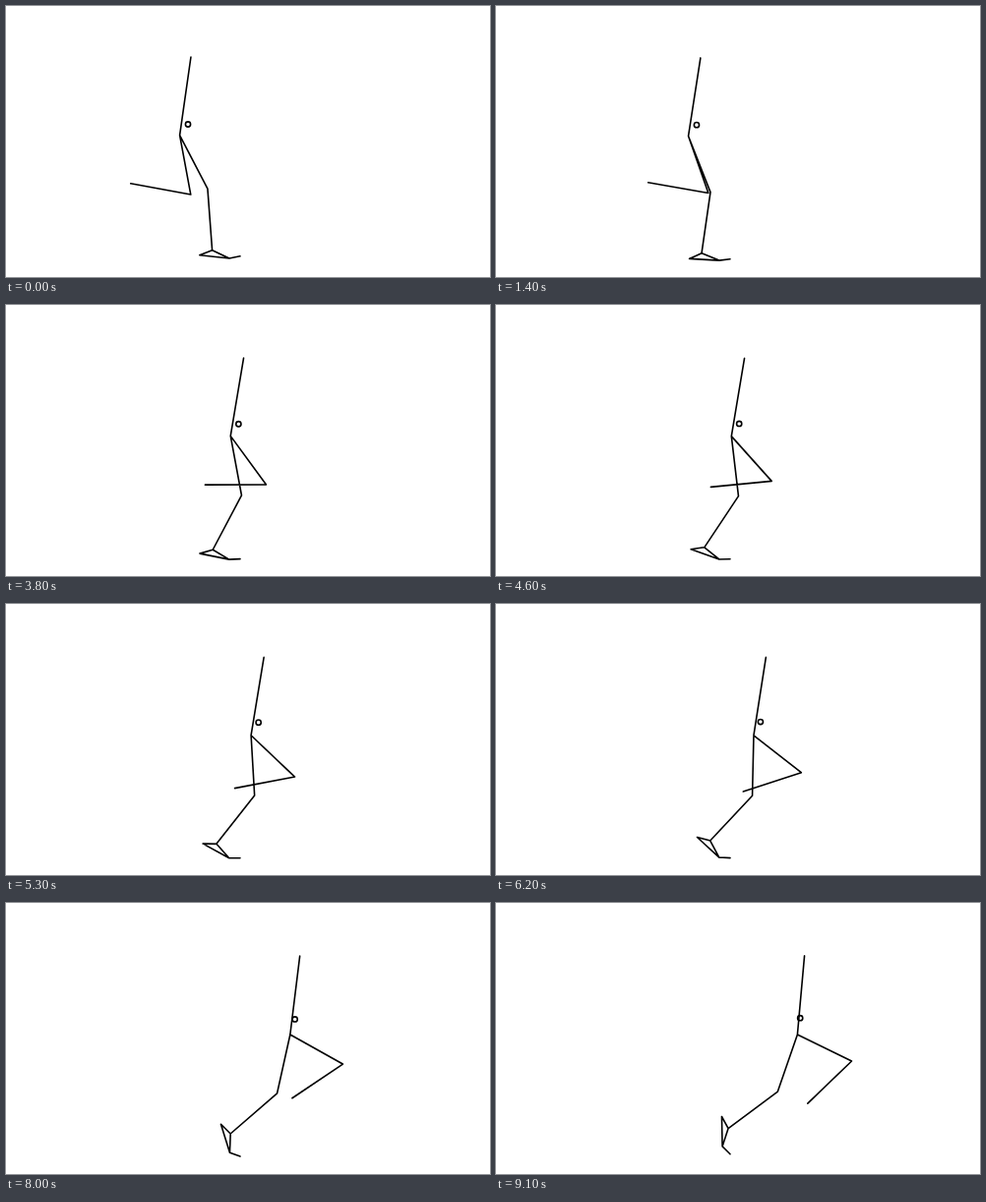
Write an HTML page that moves like this. It is 492 px wide and 276 px high and loops after 9200 ms.

```html
<!DOCTYPE html>
<html lang="en">
<head>
<meta charset="utf-8">
<title>Walking stick legs</title>
<style>
  html, body { margin: 0; width: 100%; height: 100%; overflow: hidden; background: #fff; }
  svg { display: block; width: 492px; height: 276px; }
  path, circle { fill: none; stroke: #000; stroke-width: 1.6; stroke-linecap: round; stroke-linejoin: round; }
</style>
</head>
<body>
<svg viewBox="0 0 492 276">
  <path id="body"/>
  <circle id="mass" r="2.6"/>
</svg>
<script>
const STEP = 100, STEPS = 92;
const TORSO = 80.5, THIGH = 61.4, SHANK = 62.7, FREE_SHANK = 62.1;
const FOOT = 30.4, TOE = 11.2, ANKLE_ALONG = 12.2, ANKLE_UP = 6.4;
const RAD = Math.PI / 180;

// Point at a distance from p; the angle runs clockwise from the right, in degrees.
const reach = (p, length, deg) => [
  p[0] + length * Math.cos(deg * RAD),
  p[1] + length * Math.sin(deg * RAD)
];

// Polynomial a + bu + cu² + du³
const cubic = (u, a, b, c, d) => a + u * (b + u * (c + u * d));

// Joint between two rigid bones, bending forward
function bend(top, end, upper, lower) {
  const dx = end[0] - top[0], dy = end[1] - top[1], d = Math.hypot(dx, dy);
  const cos = (upper * upper + d * d - lower * lower) / (2 * upper * d);
  const turn = Math.acos(Math.min(1, cos));
  return reach(top, upper, (Math.atan2(dy, dx) - turn) / RAD);
}

// The toe stays planted while the heel peels off and the hip travels forward.
function pose(u) {
  const left = 1 - u;
  const toeTilt = 46.5 * u ** 6 - 9.8 * left ** 4 - 1.5;
  const footTilt = 6.1 + 65 * u - 22 * Math.sin(4.08 * u);
  const lean = cubic(u, 8.1, 4.7, 0, -7.7);
  const thighSwing = cubic(u, 10.5, 52.3, 37.1, -36);
  const shankDrop = cubic(u, -10.45, -11.5, 104.8, -38.9);

  const toe = [238, 258.7 - 3.9 * left ** 9 - 2.9 * u ** 12];
  const ball = reach(toe, -TOE, toeTilt);
  const heel = reach(ball, -FOOT, footTilt);
  const ankle = reach(reach(heel, ANKLE_ALONG, footTilt), ANKLE_UP, footTilt - 90);

  const hip = [176.6 + 123.2 * u + 6.6 * u ** 4, 134 - 2.3 * left ** 2.5];
  const head = reach(hip, TORSO, lean - 90);
  const knee = bend(hip, ankle, THIGH, SHANK);
  const freeKnee = reach(hip, THIGH, 90 - thighSwing);
  const freeAnkle = reach(freeKnee, FREE_SHANK, 180 - shankDrop);
  const mass = [hip[0] + 8.4 - 5.6 * u ** 3.5, hip[1] - 11.2 - 5.6 * u * u];

  return { toe, ball, heel, ankle, hip, head, knee, freeKnee, freeAnkle, mass };
}

const body = document.getElementById("body");
const mass = document.getElementById("mass");
const line = (...points) => "M" + points.map(p => p.map(v => v.toFixed(2)).join(" ")).join("L");

function draw(u) {
  const p = pose(u);
  body.setAttribute("d",
    line(p.head, p.hip, p.knee, p.ankle, p.heel, p.ball, p.ankle) +
    line(p.ball, p.toe) +
    line(p.hip, p.freeKnee, p.freeAnkle));
  mass.setAttribute("cx", p.mass[0]);
  mass.setAttribute("cy", p.mass[1]);
}

const start = performance.now();
function tick() {
  const t = Math.max(0, performance.now() - start);
  draw(Math.floor(t / STEP) % STEPS / (STEPS - 1));
  requestAnimationFrame(tick);
}
tick();
</script>
</body>
</html>
```
